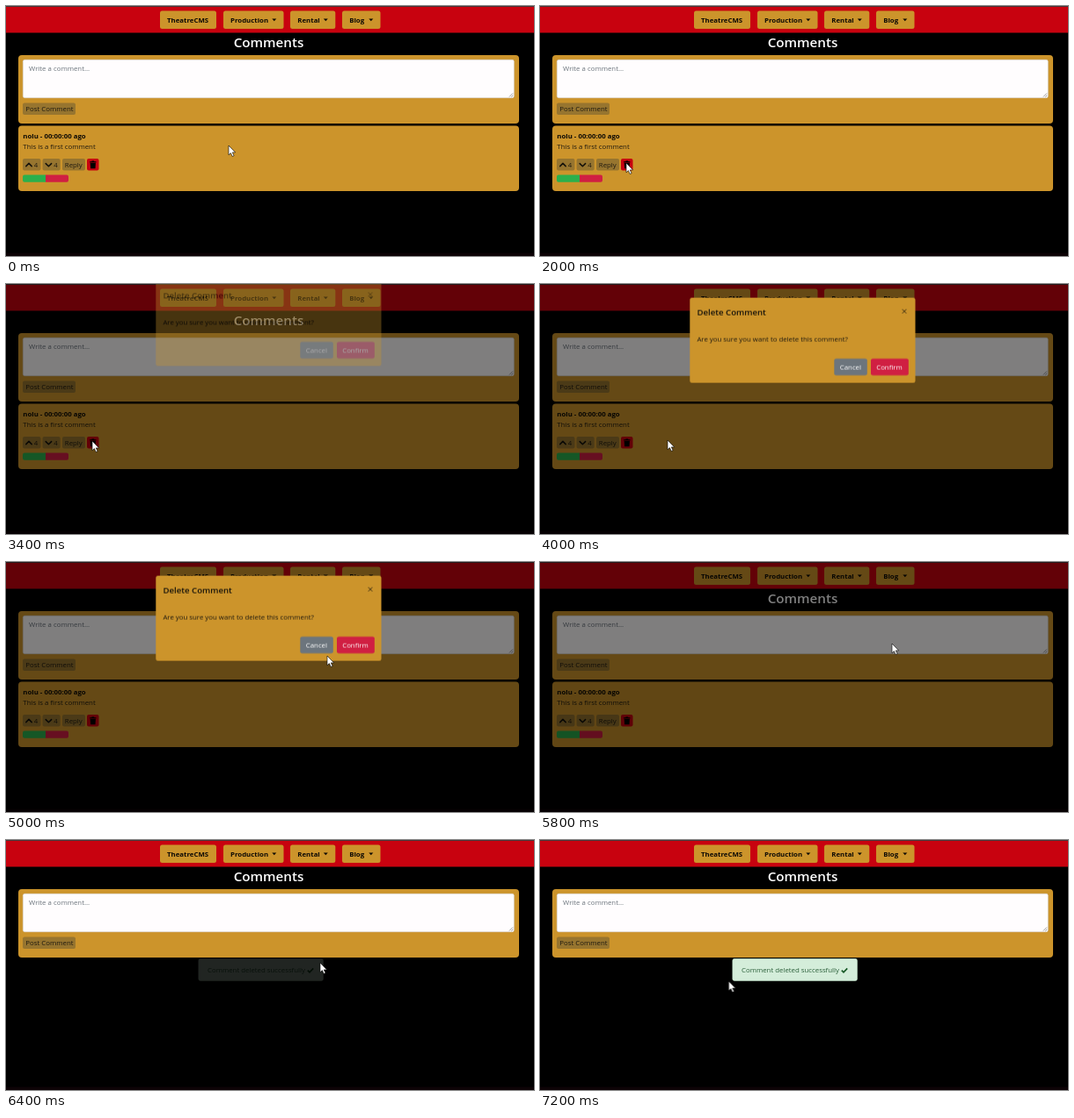
An HTML page that plays this animation: 600x285 px, repeating every 7300 ms.

```html
<!DOCTYPE html>
<html lang="en">
<head>
<meta charset="utf-8">
<title>Comments</title>
<style>
  html, body { margin: 0; width: 100%; height: 100%; overflow: hidden; background: #000; }
  svg { display: block; width: 100%; height: 100%; }
  text { font: 7.84px "Open Sans", "Noto Sans", sans-serif; fill: #1f1a10; white-space: pre; }
  .bold { font-weight: 700; fill: #0d0a05; }
  .h1 { font-size: 15.2px; font-weight: 600; fill: #fff; text-anchor: middle; }
  .h5 { font-size: 9.65px; font-weight: 600; fill: #14110a; }
  .hint { fill: #6c757d; }
  .white { fill: #fff; }
  .ok { fill: #2b5f3a; }
  .gold { fill: #cc942b; }
  .btn { fill: #97752f; }
  .red { fill: #c8020f; }
  .line { fill: none; stroke: #14110a; stroke-width: 1.5; stroke-linecap: round; stroke-linejoin: round; }

  /* 7300 ms loop drawn at ten pictures a second */
  .anim { animation: 7300ms step-end -10ms infinite both; }
  #backdrop { animation-name: backdrop; }
  #modal { animation-name: modal; }
  #comment { animation-name: comment; }
  #toast { animation-name: toast; }
  #cursor { animation-name: cursor; }

  @keyframes backdrop {
    0% { opacity: 0; }
    43.83% { opacity: .07; }
    45.2% { opacity: .4; }
    46.57% { opacity: .5; }
    80.82% { opacity: .45; }
    82.19% { opacity: .11; }
    83.56%, 100% { opacity: 0; }
  }
  @keyframes modal {
    0% { opacity: 0; transform: translateY(-25.6px); }
    46.57% { opacity: .35; transform: translateY(-19.2px); }
    47.94% { opacity: 1; transform: translateY(-8px); }
    49.31% { opacity: 1; transform: translateY(-2px); }
    50.68% { opacity: 1; transform: translateY(0); }
    78.08% { opacity: .33; transform: translateY(-12px); }
    79.45%, 100% { opacity: 0; transform: translateY(-25.6px); }
  }
  @keyframes comment {
    0% { opacity: 1; }
    79.45% { opacity: .96; }
    80.82% { opacity: .82; }
    82.19% { opacity: .57; }
    83.56% { opacity: .3; }
    84.93% { opacity: .09; }
    86.3%, 100% { opacity: 0; }
  }
  @keyframes toast {
    0% { opacity: 0; }
    87.67% { opacity: .16; }
    89.04% { opacity: .5; }
    90.41% { opacity: .85; }
    91.78%, 100% { opacity: 1; }
  }
  @keyframes cursor {
    0% { transform: translate(253px, 159px); }
    4.1% { transform: translate(253px, 159px); animation-timing-function: steps(3); }
    8.21% { transform: translate(200px, 165px); animation-timing-function: steps(3); }
    12.32% { transform: translate(130px, 180px); animation-timing-function: steps(2); }
    15.06% { transform: translate(110px, 185px); }
    16.43% { transform: translate(110px, 185px); animation-timing-function: steps(3); }
    20.54% { transform: translate(111px, 192px); animation-timing-function: steps(3); }
    24.65% { transform: translate(101px, 184px); animation-timing-function: steps(2); }
    27.39% { transform: translate(98px, 179px); }
    46.57% { transform: translate(98px, 179px); animation-timing-function: steps(4); }
    52.05% { transform: translate(114px, 204px); animation-timing-function: steps(4); }
    57.53% { transform: translate(176px, 152px); animation-timing-function: steps(4); }
    63.01% { transform: translate(248px, 98px); animation-timing-function: steps(4); }
    68.49% { transform: translate(365px, 107px); animation-timing-function: steps(4); }
    73.97% { transform: translate(400px, 93px); }
    82.19% { transform: translate(400px, 93px); animation-timing-function: steps(4); }
    87.67% { transform: translate(357px, 140px); animation-timing-function: steps(8); }
    98.63%, 100% { transform: translate(214.5px, 161px); }
  }
</style>
</head>
<body>
<svg viewBox="0 0 600 285" preserveAspectRatio="none">
  <defs>
    <path id="caret" d="M0 0h5l-2.5 2.6z" fill="#0d0a05"/>
  </defs>

  <rect width="600" height="285"/>
  <rect y="281.5" width="600" height="3.5" fill="#0d0306"/>

  <!-- navigation -->
  <rect width="600" height="31" fill="#3a0508"/>
  <rect y="1" width="600" height="29.3" class="red"/>
  <rect width="600" height="1" fill="#46393b"/>
  <g class="gold">
    <rect x="175" y="5.5" width="64" height="20.5" rx="2.5"/>
    <rect x="247" y="5.5" width="68.5" height="20.5" rx="2.5"/>
    <rect x="323" y="5.5" width="51.3" height="20.5" rx="2.5"/>
    <rect x="382" y="5.5" width="43.5" height="20.5" rx="2.5"/>
  </g>
  <text x="183" y="19" class="bold">TheatreCMS</text>
  <text x="255" y="19" class="bold">Production</text>
  <text x="331.3" y="19" class="bold">Rental</text>
  <text x="390.2" y="19" class="bold">Blog</text>
  <use href="#caret" x="302.3" y="14.6"/>
  <use href="#caret" x="360.8" y="14.6"/>
  <use href="#caret" x="412.3" y="14.6"/>

  <text x="298.5" y="47.3" class="h1">Comments</text>

  <!-- comment form -->
  <rect x="14" y="56" width="569" height="78" rx="4" class="gold"/>
  <rect x="19.3" y="61.3" width="558" height="43.4" rx="2" fill="#fffdfe" stroke="#ced0d4" stroke-width=".5"/>
  <path d="M572 103.5l4-4M574.3 103.7l1.9-1.9" stroke="#555" stroke-width=".6"/>
  <text x="26" y="74.3" class="hint">Write a comment...</text>
  <rect x="19" y="110.5" width="60" height="13.5" rx="2" class="btn"/>
  <text x="22.3" y="120.2">Post Comment</text>

  <!-- posted comment -->
  <g id="comment" class="anim">
    <rect x="14" y="136.5" width="569" height="74.5" rx="4" class="gold"/>
    <text x="19.3" y="151.2" class="bold">nolu - 00:00:00 ago</text>
    <text x="19.3" y="163.4">This is a first comment</text>
    <g class="btn">
      <rect x="19" y="174" width="20.5" height="13.5" rx="2"/>
      <rect x="41.5" y="174" width="20.2" height="13.5" rx="2"/>
      <rect x="64" y="174" width="26" height="13.5" rx="2"/>
    </g>
    <path d="M22.8 182.6l3.2-3.2 3.2 3.2M45.2 179.6l3.2 3.2 3.2-3.2" class="line"/>
    <text x="31.8" y="183.8">4</text>
    <text x="54.2" y="183.8">4</text>
    <text x="66.8" y="183.8">Reply</text>
    <rect x="92" y="174" width="13.5" height="13.5" rx="2" class="red"/>
    <path d="M95.2 177.3h2l.5-.8h2.2l.5.8h2v1.1h-7.2zM95.7 179h6.2l-.4 6.3h-5.4z"/>
    <path d="M21 192.5h24v8.3h-24a2 2 0 0 1-2-2v-4.3a2 2 0 0 1 2-2z" fill="#2bb04c"/>
    <path d="M45 192.5h24a2 2 0 0 1 2 2v4.3a2 2 0 0 1-2 2h-24z" fill="#d01f42"/>
  </g>

  <g id="toast" class="anim">
    <rect x="218.8" y="135.3" width="141.7" height="25.2" rx="2.3" fill="#d4edda" stroke="#c3e6cb" stroke-width=".5"/>
    <text x="229" y="151" class="ok">Comment deleted successfully</text>
    <path d="M342.8 148.6l2.2 2.2 4.2-4.4" fill="none" stroke="#155724" stroke-width="1.7"/>
  </g>

  <rect id="backdrop" class="anim" width="600" height="285"/>

  <!-- confirmation dialog -->
  <g id="modal" class="anim">
    <rect x="170.3" y="15.5" width="256.2" height="97" rx="2.5" class="gold"/>
    <text x="178.4" y="35.6" class="h5">Delete Comment</text>
    <path d="M411.7 28.8l4.6 4.6m0-4.6l-4.6 4.6" stroke="#2c2411" stroke-width=".9"/>
    <text x="178.4" y="65.4">Are you sure you want to delete this comment?</text>
    <rect x="334.3" y="85" width="37.5" height="19" rx="2.2" fill="#6c757d"/>
    <rect x="376" y="85" width="42.8" height="19" rx="2.2" fill="#d01f42"/>
    <text x="340.8" y="97.5" class="white">Cancel</text>
    <text x="382.2" y="97.5" class="white">Confirm</text>
  </g>

  <g id="cursor" class="anim">
    <path d="M0 0v10.8l2.4-2.2 1.8 3.9 1.9-.9-1.8-3.7h3.3z" fill="#fff" stroke="#000" stroke-width=".6"/>
  </g>
</svg>
</body>
</html>
```
